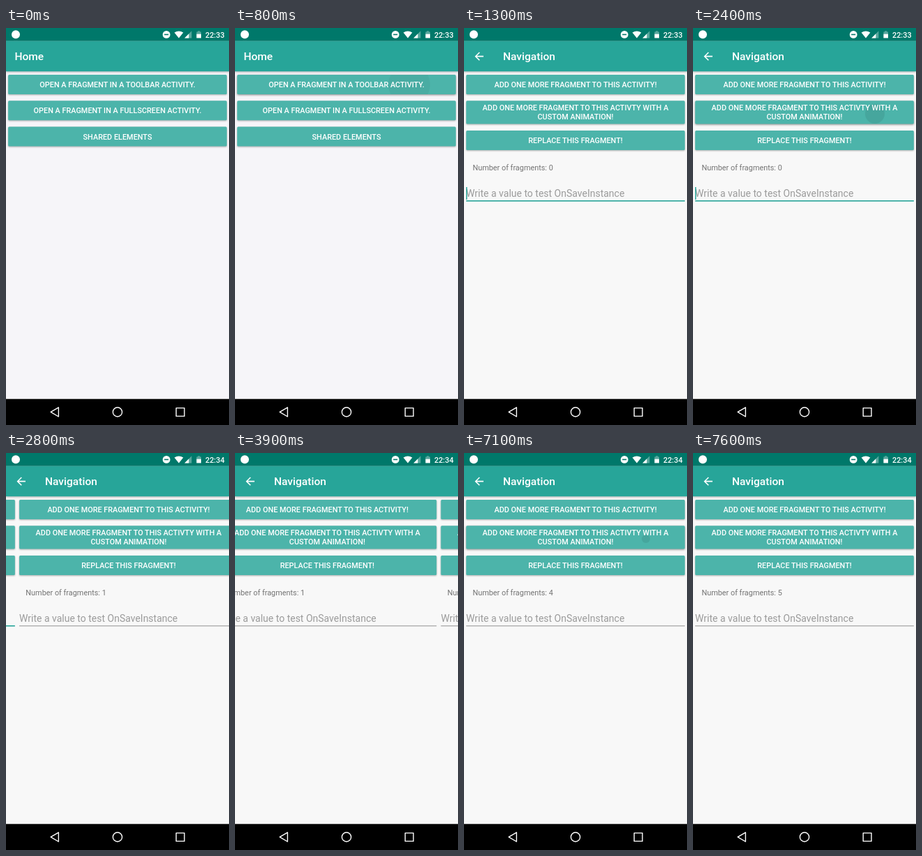
Animation, 320 px wide and 569 px high, one loop 8 s. Source, as an HTML page:

```html
<!DOCTYPE html>
<html lang="en">
<head>
<meta charset="utf-8">
<title>Fragment navigation</title>
<style>
html, body { margin: 0; width: 100%; height: 100%; overflow: hidden; background: #000; }
svg { display: block; width: 100%; height: 100%; }
text { font: 10.89px Roboto, sans-serif; }
.label, .clock { font-weight: 500; fill: #fff; }
.label { text-anchor: middle; }
.title { font-size: 15.56px; font-weight: 500; fill: #fff; }
.info { fill: #747474; }
.hint { font-size: 14px; fill: #9b9b9b; }
.button { filter: drop-shadow(0 1px 1px rgba(0, 0, 0, .3)); }
.pressed { filter: drop-shadow(0 1px 1.6px rgba(0, 0, 0, .45)); }
.bar { filter: drop-shadow(0 1.5px 1.5px rgba(0, 0, 0, .28)); }
</style>
</head>
<body>
<svg id="stage" viewBox="0 0 320 569"></svg>
<script>
const stage = document.getElementById('stage');
const LOOP = 8000, STEP = 100;
const TEAL = '#27a599', DARK = '#00786a', LIGHT = '#4cb4aa';

// Taps: start time, button index, position
const taps = [
  { at: 670, button: 0, x: 250, y: 81 },
  { at: 2350, button: 1, x: 261, y: 123 },
  { at: 3650, button: 1, x: 261, y: 123 },
  { at: 4820, button: 0, x: 240, y: 81 },
  { at: 6070, button: 0, x: 240, y: 81 },
  { at: 7090, button: 1, x: 261, y: 123 }
];
const RIPPLE = 180;

// Each new fragment slides in over "time" ms, or appears at once
const changes = [
  { at: 2543, time: 300 },
  { at: 3843, time: 300 },
  { at: 4950, time: 0 },
  { at: 6150, time: 0 },
  { at: 7243, time: 300 }
];

const clamp = v => Math.max(0, Math.min(1, v));
const rect = (x, y, w, h, fill, more = '') =>
  `<rect x="${x}" y="${y}" width="${w}" height="${h}" fill="${fill}" ${more}/>`;
const text = (x, y, cls, s) => `<text x="${x}" y="${y}" class="${cls}">${s}</text>`;
const move = (x, y, body, more = '') => `<g transform="translate(${x} ${y})" ${more}>${body}</g>`;

function button(index, y, h, lines, tap) {
  const hit = tap && tap.button === index;
  const first = y + h / 2 + 3.9 - (lines.length - 1) * 6.4;
  let out = rect(3.1, y, 313.8, h, LIGHT, `rx="1.5" class="button ${hit ? 'pressed' : ''}"`);
  if (hit) {
    const alpha = .08 * Math.min(1, (RIPPLE - tap.age) / 90);
    out += `<clipPath id="edge">${rect(3.1, y, 313.8, h, '#000', 'rx="1.5"')}</clipPath>
      <circle cx="${tap.x}" cy="${tap.y}" r="${4 + tap.age * .2}" opacity="${alpha}" clip-path="url(#edge)"/>`;
  }
  return out + lines.map((s, i) => text(160, first + i * 12.8, 'label', s)).join('');
}

function fragment(n, tap, cursor) {
  return button(0, 66.9, 28, ['ADD ONE MORE FRAGMENT TO THIS ACTIVITY!'], tap) +
    button(1, 104.2, 33.4, ['ADD ONE MORE FRAGMENT TO THIS ACTIVTY WITH A', 'CUSTOM ANIMATION!'], tap) +
    button(2, 146.9, 28, ['REPLACE THIS FRAGMENT!'], tap) +
    text(12.4, 204, 'info', 'Number of fragments: ' + n) +
    text(3.1, 242, 'hint', 'Write a value to test OnSaveInstance') +
    (n ? rect(3.1, 247.4, 313.8, .9, '#868686') : rect(3.1, 247, 313.8, 1.6, TEAL)) +
    (cursor ? rect(3, 228, 1.5, 18, TEAL) : '');
}

function screen(bg, title, titleX, content, extra = '') {
  return rect(0, 0, 320, 569, bg) + content +
    rect(0, 18.7, 320, 43.5, TEAL, 'class="bar"') + rect(0, 0, 320, 18.7, DARK) +
    text(titleX, 46.3, 'title', title) + extra + rect(0, 531.7, 320, 37.3, '#000');
}

function home(tap) {
  return screen('#f6f5f9', 'Home', 12.4,
    button(0, 66.9, 28, ['OPEN A FRAGMENT IN A TOOLBAR ACTIVITY.'], tap) +
    button(1, 104.2, 28, ['OPEN A FRAGMENT IN A FULLSCREEN ACTIVITY.'], tap) +
    button(2, 141.6, 28, ['SHARED ELEMENTS'], tap));
}

function navigation(t, tap) {
  const n = changes.filter(c => c.at <= t).length;
  const last = changes[n - 1];
  const u = last && last.time ? clamp((t - last.at) / last.time) : 1;
  const shift = 320 * (1 - Math.cos(Math.PI * u)) / 2;
  const cursor = t < 1400 || (t >= 2000 && t < 2500);
  const content = u < 1
    ? move(-shift, 0, fragment(n - 1)) + move(320 - shift, 0, fragment(n))
    : fragment(n, tap, !n && cursor);
  const arrow = `<path transform="translate(12.4 31.3) scale(.778)" fill="#fff"
    d="M20 11H7.83l5.59-5.59L12 4l-8 8 8 8 1.41-1.41L7.83 13H20z"/>`;
  return screen('#f8f8f8', 'Navigation', 56, content, arrow);
}

function system(t) {
  return `<g fill="#fff">
    <circle cx="14" cy="9.3" r="6"/>
    <circle cx="230.2" cy="9.4" r="5.4"/>${rect(227.2, 8.6, 6, 1.6, DARK)}
    <path d="M241.6 6.6Q248 2.6 254.4 6.6L248 14.4z"/>
    <path d="M266.4 4.2V14.4H256.2z" opacity=".35"/><path d="M262.4 8.2V14.4H256.2z"/>
    <path d="M273.4 5.4h1.8v-1.2h3v1.2h1.8v3.4h-6.6z" opacity=".35"/>${rect(273.4, 8.6, 6.6, 5.8, '#fff')}
    </g>` + text(286, 13.6, 'clock', t < 2600 ? '22:33' : '22:34') +
    `<g fill="none" stroke="#fff" stroke-width="1.4" stroke-linejoin="round">
    <path d="M75.4 543.8V557L64.2 550.4z"/><circle cx="160" cy="550.4" r="6.6"/>
    <rect x="244.2" y="544.6" width="11.8" height="11.8"/></g>`;
}

function draw(t) {
  const found = taps.find(p => t >= p.at && t < p.at + RIPPLE);
  const tap = found && { ...found, age: t - found.at };
  const age = t - 885;
  const rise = 45 * (1 - clamp(age / 350)) ** 5;
  const alpha = 1 - (1 - clamp(age / 200)) ** 4;
  stage.innerHTML = (alpha < 1 ? home(tap) : rect(0, 0, 320, 60, DARK) + rect(0, 18.7, 320, 43.5, TEAL)) +
    (age > 0 ? move(0, rise, navigation(t, tap), `opacity="${alpha}"`) : '') + system(t);
}

const start = performance.now();
let shown = -1;
function tick() {
  const t = Math.floor((performance.now() - start) % LOOP / STEP) * STEP;
  if (t !== shown) draw(shown = t);
  requestAnimationFrame(tick);
}
tick();
</script>
</body>
</html>
```
